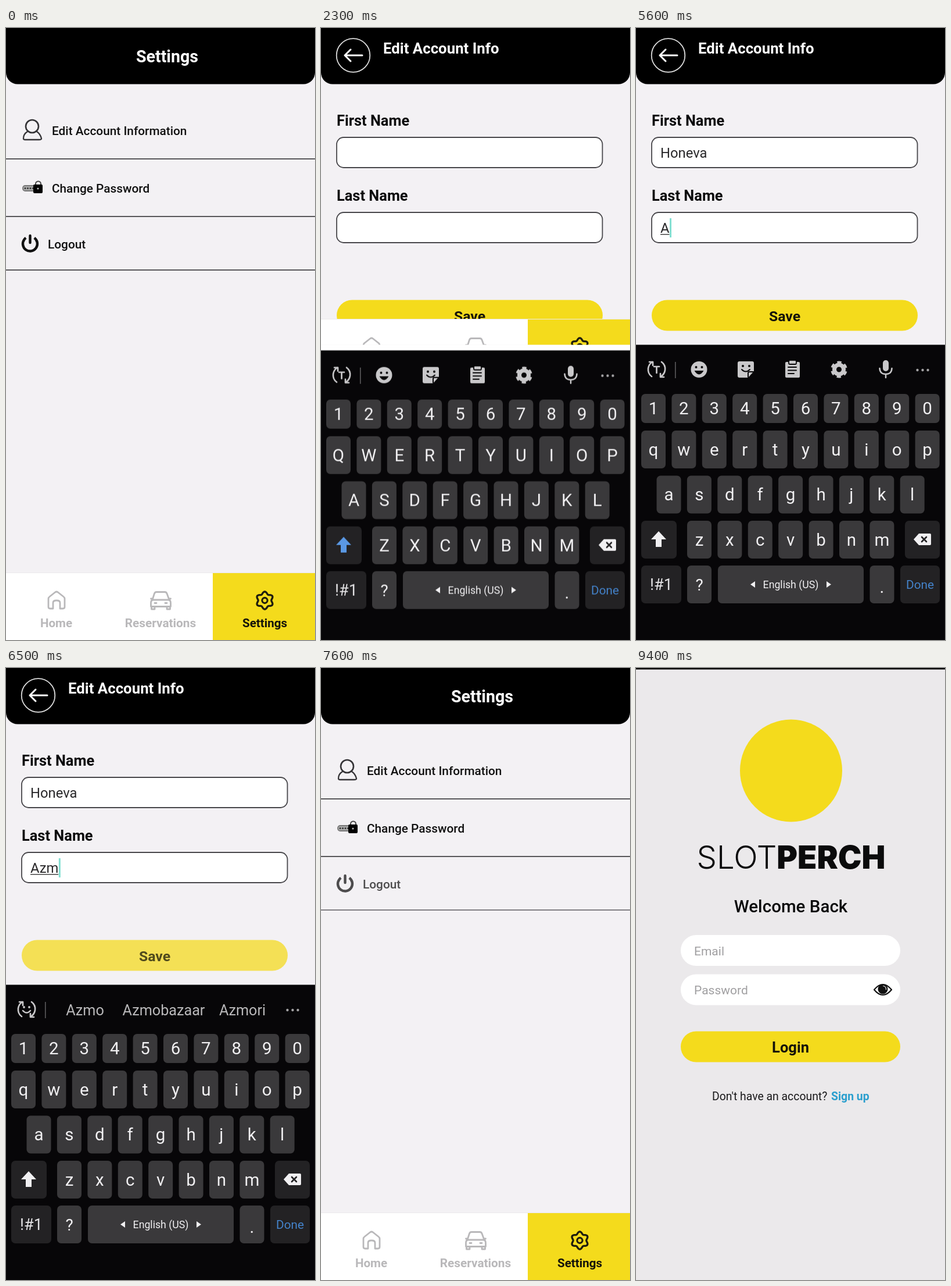
Write an HTML page with a canvas that moves like this. It is 532 by 1052 pixels and loops after 9.5 s.

```html
<!DOCTYPE html>
<html lang="en">
<head>
<meta charset="utf-8">
<title>Account settings</title>
<style>
  html, body { margin: 0; width: 100%; height: 100%; overflow: hidden; background: #fff; }
  canvas { display: block; }
</style>
</head>
<body>
<canvas id="stage" width="532" height="1052"></canvas>
<script>
const W = 532, H = 1052, NAV_H = 115, KEYS_TOP = 544.5;
const LOOP = 9500, STEP = 100;
const YELLOW = '#f4db1c', PAGE = '#f3f1f4', ICON = '#c9c8ca', KEYS_BG = '#070608';
const TAU = Math.PI * 2;

// Moments of the story, in ms
const OPEN_EDIT = 1470, KEYS_IN = 2187, CLOSE_EDIT = 6530, KEYS_OUT = 6821,
      NAV_BACK = 7050, CLOSE_APP = 7966;
const first = { text: 'Honeva', times: [2400, 2700, 3000, 3300, 3600, 3850, 4200] };
const last = { text: 'Azm', times: [4700, 5520, 5800, 6100] };

const screen = document.getElementById('stage').getContext('2d');
const keysCanvas = document.createElement('canvas');
keysCanvas.width = W;
keysCanvas.height = H;
const keysCtx = keysCanvas.getContext('2d');
let c = screen;

// ---------- timing ----------
const ramp = (t, start, length) => Math.min(1, Math.max(0, (t - start) / length));
const inOut = x => x < .5 ? 2 * x * x : 1 - 2 * (1 - x) ** 2;

function revealEase(x) {
  const curve = (s, a, b) => 3 * s * (1 - s) ** 2 * a + 3 * s * s * (1 - s) * b + s ** 3;
  let lo = 0, hi = 1;
  for (let i = 0; i < 30; i++) {
    const mid = (lo + hi) / 2;
    if (curve(mid, .20833, .25) < x) lo = mid; else hi = mid;
  }
  return curve(lo, .82, 1);
}
const reveal = (t, start) => revealEase(ramp(t, start, 425));
const pressAlpha = (t, start) => 1 - .8 * (ramp(t, start, 150) - ramp(t, start + 150, 250));
const typed = (field, t) =>
  field.text.slice(0, Math.max(0, field.times.filter(time => time <= t).length - 1));

// ---------- drawing helpers ----------
function text(s, x, y, size, weight, color, align = 'left', family = 'Roboto') {
  c.font = `${weight} ${size}px ${family}, sans-serif`;
  c.textAlign = align;
  c.fillStyle = color;
  c.fillText(s, x, y);
}
function rect(x, y, w, h, color) {
  c.fillStyle = color;
  c.fillRect(x, y, w, h);
}
function box(x, y, w, h, r, fill, stroke) {
  c.beginPath();
  c.roundRect(x, y, w, h, r);
  c.fillStyle = fill;
  c.fill();
  if (stroke) {
    c.strokeStyle = stroke;
    c.lineWidth = 1.8;
    c.stroke();
  }
}
function stroke(d, color, width) {
  c.strokeStyle = color;
  c.lineWidth = width;
  c.lineCap = c.lineJoin = 'round';
  c.stroke(new Path2D(d));
}
function fill(d, color) {
  c.fillStyle = color;
  c.fill(new Path2D(d));
}
function dot(x, y, r, color) {
  c.beginPath();
  c.arc(x, y, r, 0, TAU);
  c.fillStyle = color;
  c.fill();
}
function ring(x, y, r, color, width, from = 0, to = TAU) {
  c.beginPath();
  c.arc(x, y, r, from, to);
  c.strokeStyle = color;
  c.lineWidth = width;
  c.stroke();
}
function layer(paint) {
  c.save();
  paint();
  c.restore();
}
function clipTo(y, h) {
  c.beginPath();
  c.rect(0, y, W, h);
  c.clip();
}

// The upper card slides out of a window that opens from the bottom edge.
function cards(p, height, under, over) {
  if (p < 1) layer(() => {
    c.translate(0, -.02 * height * p);
    under();
  });
  if (p > 0) {
    rect(0, 0, W, height, `rgba(0,0,0,${.1 * Math.min(1, p / .36)})`);
    layer(() => {
      const top = height * (1 - p);
      clipTo(top, height - top);
      c.translate(0, top * .041);
      over();
    });
  }
}

// ---------- pages ----------
function header() {
  rect(0, 0, W, H + 40, PAGE);
  box(0, -30, W, 126.5, [0, 0, 20, 20], '#000');
}

function settingsRow(alpha, label, x, baseline, divider, icon) {
  layer(() => {
    c.globalAlpha = alpha;
    icon();
    text(label, x, baseline, 20.8, 500, '#111');
    rect(0, divider, W, 2, '#58575a');
  });
}

function settingsPage(t) {
  header();
  text('Settings', 277.5, 59, 28.6, 700, '#fff', 'center');
  settingsRow(pressAlpha(t, 950), 'Edit Account Information', 79, 183.5, 224, () => {
    ring(45, 169, 11, '#343336', 2.6);
    stroke('M37 178C32 181 30 186 30 190Q30 192 33 192H57Q61 192 61 190C60 186 58 181 53 178', '#343336', 2.3);
  });
  settingsRow(1, 'Change Password', 79, 283, 323, () => {
    box(29, 271, 22, 9, 4, '#aaa', '#777');
    for (let x = 33; x < 47; x += 4.5) dot(x, 275.5, 1.5, '#333');
    stroke('M51 270V268a4.5 4.5 0 0 1 9 0V270', '#444', 2);
    box(47, 269, 16, 15, 2, '#000');
    dot(55, 276, 1.6, '#bbb');
  });
  settingsRow(pressAlpha(t, 7550), 'Logout', 72, 379, 415, () => {
    ring(41.5, 371, 12.5, '#111', 4.4, -.95, Math.PI + .95);
    stroke('M41.5 357V369', '#111', 4.4);
  });
}

function input(y, label, field, t, focused) {
  text(label, 27, y - 20, 25.4, 700, '#0b0b0c');
  box(27, y, 457.5, 52, 12, '#fff', '#47464a');
  const value = typed(field, t);
  text(value, 42, y + 35, 23.8, 400, '#29282a');
  if (!focused) return;
  const end = 42 + c.measureText(value).width;
  if (value) rect(42, y + 37, end - 42, 1.5, '#444');
  const latest = field.times.filter(time => time <= t).pop();
  if ((t - latest) % 1000 < 500) rect(end + .5, y + 10, 3, 33, '#83dfd2');
}

function editPage(t) {
  header();
  ring(55.5, 47, 28.8, '#dedede', 1.8);
  stroke('M41 47H71M51 37L41 47L51 57', '#fff', 3);
  text('Edit Account Info', 107, 43.5, 25.8, 700, '#fff');
  input(188, 'First Name', first, t, t >= first.times[0] && t < last.times[0]);
  input(317, 'Last Name', last, t, t >= last.times[0]);
  layer(() => {
    c.globalAlpha = pressAlpha(t, 6450);
    box(27, 467.5, 458, 53, 26.5, YELLOW);
    text('Save', 256, 504, 24.8, 700, '#15140a', 'center');
  });
}

function gear(x, y, color) {
  c.beginPath();
  for (let i = 0; i < 72; i++) {
    const a = i / 72 * TAU, r = 13.2 + 1.9 * Math.cos(6 * a);
    c.lineTo(x + r * Math.sin(a), y - r * Math.cos(a));
  }
  c.closePath();
  c.strokeStyle = color;
  c.lineWidth = 3.3;
  c.stroke();
  ring(x, y, 4.6, color, 3.1);
}

function nav(top) {
  const gray = '#b9b8ba';
  layer(() => {
    c.translate(0, top);
    rect(0, -1, W, 1, '#ebe9ec');
    rect(0, 0, W, NAV_H, '#fff');
    rect(356, 0, 176, NAV_H, YELLOW);
    stroke('M81 61H76Q73 61 73 58V44Q73 42 75 40.500L84.500 33Q87 31 89.500 33L99 40.500Q101 42 101 44V58Q101 61 98 61H93V51Q93 47 87 47Q81 47 81 51V61Z', gray, 2.8);
    stroke('M252 46L255.500 35Q256.500 32.500 259 32.500H273.500Q276 32.500 277 35L281 46M249.500 44H252M281 44H283.500M249.500 51Q249.500 46 254 46H279Q283.500 46 283.500 51V57.500H249.500ZM250.500 58V62H256V58M277 58V62H282.500V58M256 51.500H259M274 51.500H277', gray, 2.8);
    gear(445.5, 47, '#1f1d0e');
    text('Home', 86.5, 93, 20.6, 700, gray, 'center');
    text('Reservations', 266, 93, 20.8, 700, gray, 'center');
    text('Settings', 445.5, 93, 20.6, 700, '#15140a', 'center');
  });
}

function loginPage() {
  rect(0, 0, W, H + 40, '#ebe9eb');
  dot(267, 176.5, 88, YELLOW);
  const light = ['SLOT', 300], heavy = ['PERCH', 900];
  const widths = [light, heavy].map(([word, weight]) => {
    c.font = `${weight} 54.5px Inter, sans-serif`;
    return c.measureText(word).width;
  });
  const left = 267 - (widths[0] + widths[1]) / 2;
  text(light[0], left, 345, 54.5, light[1], '#0b0b0c', 'left', 'Inter');
  text(heavy[0], left + widths[0], 345, 54.5, heavy[1], '#0b0b0c', 'left', 'Inter');
  text('Welcome Back', 266.5, 420, 29.5, 500, '#0b0b0c', 'center');
  box(77, 459, 378, 53, 26.5, '#fff');
  box(77, 526.5, 378, 53, 26.5, '#fff');
  text('Email', 100, 494, 21, 400, '#a09fa1');
  text('Password', 100, 561, 21, 400, '#a09fa1');
  stroke('M410 553Q425 535 440 553Q425 571 410 553Z', '#111', 2.2);
  dot(425, 552, 8.5, '#111');
  ring(425, 552, 5.5, '#ddd', 1.4, -1.4, .1);
  box(77, 624.5, 378, 53, 26.5, YELLOW);
  text('Login', 266, 661, 25.5, 700, '#15140a', 'center');
  text("Don't have an account?", 131, 743, 19.4, 400, '#1b1a1c');
  text('Sign up', 336, 743, 19.4, 700, '#2b9fce');
}

// ---------- keyboard ----------
function key(x, y, w, h, label, size = 29.5, fillColor = '#3a393b', color = '#f1f0f2', drop = 10) {
  box(x, y, w, h, 7, fillColor);
  text(label, x + w / 2, y + h / 2 + drop, size, 400, color, 'center');
}
function keyRow(letters, x, y, h) {
  [...letters].forEach((letter, i) => key(x + i * 52.4, y, 42, h, letter));
}

function cycleIcon(smiling) {
  stroke('M27 599Q20 594 21 585Q22 578 28 574M23 574H29V580M44 574Q51 579 50 588Q49 595 43 599M48 600H42V594', ICON, 2.7);
  if (smiling) {
    dot(31, 583, 1.9, ICON);
    dot(40, 583, 1.9, ICON);
    stroke('M29 589Q35.500 596 42 589', ICON, 2.5);
  } else stroke('M31 582H40M35.500 582V593', ICON, 2.7);
}

function face(x, y) {
  dot(x - 5, y - 4, 2, KEYS_BG);
  dot(x + 5, y - 4, 2, KEYS_BG);
  fill(`M${x - 8} ${y + 2}H${x + 8}Q${x} ${y + 15} ${x - 8} ${y + 2}Z`, KEYS_BG);
}

function toolbar() {
  dot(108.5, 587, 14, ICON);
  face(108.5, 587);
  fill('M178 573H200Q203 573 203 576V590L193 601H178Q175 601 175 598V576Q175 573 178 573Z', ICON);
  dot(184, 581, 2, KEYS_BG);
  dot(195, 581, 2, KEYS_BG);
  stroke('M182 587Q189 594 196 587M193 600V593Q193 591 196 591H203', KEYS_BG, 2);
  box(257, 574, 25, 27, 2, ICON);
  box(263, 571, 13, 7, 2, ICON, KEYS_BG);
  stroke('M262 583H276M262 588.500H276M262 594H272', KEYS_BG, 2);
  ring(349.5, 587, 8, ICON, 7);
  layer(() => {
    c.lineCap = 'butt';
    c.setLineDash([7, 12.4 * TAU / 6 - 7]);
    ring(349.5, 587, 12.4, ICON, 4, -.8);
  });
  box(425, 571, 10, 19, 5, ICON);
  stroke('M419.500 585Q420 595 430 595Q440 595 440.500 585M430 595V601', ICON, 2.5);
}

function suggestions(t) {
  const typing = typed(first, t);
  const words = t >= last.times[0] ? ['Azmo', 'Azmobazaar', 'Azmori'] : ['Honeva', typing, 'Honey'];
  words.forEach((word, i) => text(word, 136 + i * 135.5, 597, 25.2, 400, '#b9b8ba', 'center'));
}

function keyboard(t) {
  const dark = '#232224';
  const value = typed(t >= last.times[0] ? last : first, t);
  const caps = value === '';
  const cased = s => caps ? s.toUpperCase() : s;
  const suggesting = value.length > 1;

  rect(0, KEYS_TOP, W, H, KEYS_BG);
  cycleIcon(suggesting);
  rect(67, 574, 1.6, 28, '#5b5a5c');
  if (suggesting) suggestions(t); else toolbar();
  for (let x = 484.5; x < 505; x += 9) dot(x, 588, 2.2, '#a3a2a4');

  keyRow('1234567890', 9, 629, 50);
  keyRow(cased('qwertyuiop'), 9, 692, 65);
  keyRow(cased('asdfghjkl'), 35.5, 769.5, 65);
  keyRow(cased('zxcvbnm'), 88, 847, 65);

  box(9, 847, 61, 65, 7, dark);
  fill('M39 865L52 879H44V892H34V879H26Z', caps ? '#5a98e4' : '#f1f0f2');
  box(463, 847, 60, 65, 7, dark);
  fill('M478 879L487 869H506Q508 869 508 871V887Q508 889 506 889H487Z', '#f1f0f2');
  stroke('M492 875L500 883M500 875L492 883', dark, 2.6);

  key(9, 924, 69, 65, '!#1', 27, dark, '#e4e3e5', 9);
  key(88, 924, 42, 65, '?', 28);
  key(141, 924, 251, 65, 'English (US)', 17.7, '#3a393b', '#f1f0f2', 6);
  fill('M205 951V962L197 956.500ZM328 951V962L336 956.500Z', '#f1f0f2');
  key(402.5, 924, 42, 65, '.', 29.5, '#3a393b', '#f1f0f2', 14);
  key(455, 924, 68, 65, 'Done', 20.8, dark, '#4483cb', 7);
}

function drawKeyboard(t) {
  if (t < KEYS_IN || t >= KEYS_OUT + 150) return;
  const entering = 1 - (1 - ramp(t, KEYS_IN, 200)) ** 2;
  const leaving = ramp(t, KEYS_OUT, 150);
  c = keysCtx;
  c.clearRect(0, 0, W, H);
  keyboard(t);
  c = screen;
  layer(() => {
    c.globalAlpha = Math.min(1, .5 + entering * .65) * (1 - leaving ** 3);
    c.drawImage(keysCanvas, 0, 51 * (1 - entering + leaving ** 2));
  });
}

// ---------- whole picture ----------
function account(t) {
  const shrunk = t >= KEYS_IN && t < KEYS_OUT;
  const height = shrunk ? KEYS_TOP : H;
  const hidden = inOut(ramp(t, KEYS_IN, 200)) - inOut(ramp(t, NAV_BACK, 250));
  const editing = reveal(t, OPEN_EDIT) - reveal(t, CLOSE_EDIT);
  rect(0, 0, W, H, '#fff');
  layer(() => {
    clipTo(0, height);
    cards(editing, shrunk ? KEYS_TOP : H - NAV_H, () => settingsPage(t), () => editPage(t));
    if (hidden < 1) nav(height - NAV_H * (1 - hidden));
  });
  drawKeyboard(t);
}

function draw(t) {
  cards(1 - reveal(t, CLOSE_APP), H, loginPage, () => account(t));
  rect(0, 0, W, 2.5, '#000');
}

const start = performance.now();
function tick() {
  const t = (performance.now() - start) % LOOP;
  draw(Math.floor(t / STEP) * STEP);
  requestAnimationFrame(tick);
}
tick();
</script>
</body>
</html>
```
